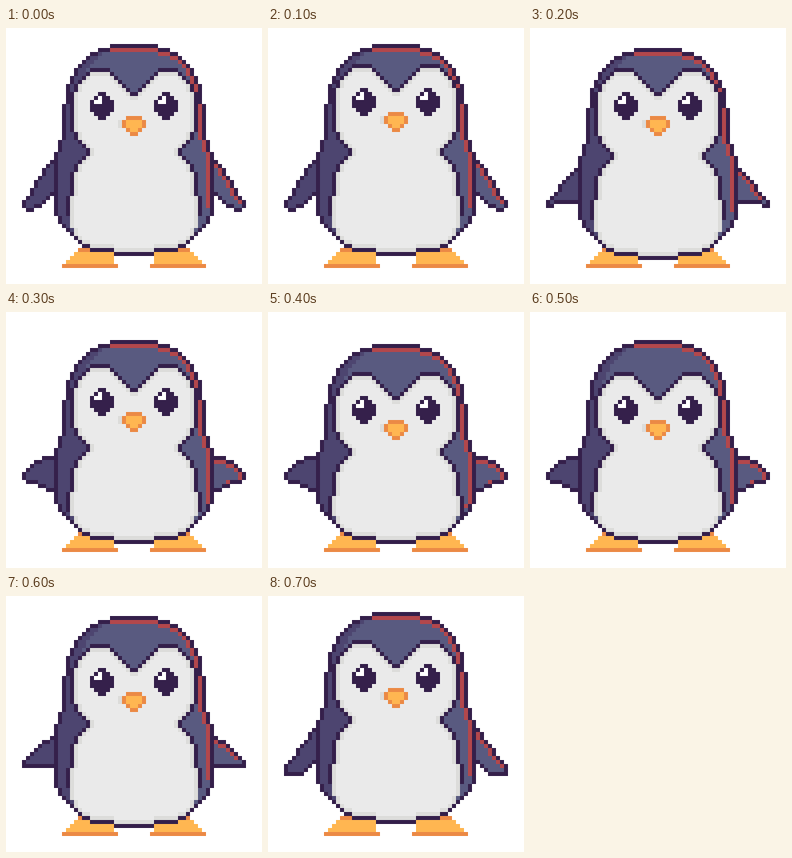
An HTML page with a canvas for the animation above (0.8 s loop, 320 by 320 pixels).

```html
<!DOCTYPE html>
<html lang="en">
<head>
<meta charset="utf-8">
<title>Pixel penguin</title>
<style>
html, body { margin: 0; width: 100%; height: 100%; overflow: hidden; background: #fff; }
canvas { display: block; width: 100vw; height: 100vh; image-rendering: pixelated; }
</style>
</head>
<body>
<canvas id="stage" width="320" height="320"></canvas>
<script>
const ctx = document.getElementById('stage').getContext('2d');
const N = 64, CELL = 5, STEP = 100;
const INK = '#35204b', BLUE = '#595a80', SHADE = '#4d4570', RED = '#b2474c';
const WHITE = '#eaeaea', GRAY = '#dcdcda', GOLD = '#ffb651', AMBER = '#eb8a46';

// Left edges of the half figure; the right half mirrors them.
const HEAD = [26, 23, 21, 20, 19, 18, 17, 17, 16, 16, 15, 15, 15, 15, 15,
  14, 14, 14, 14, 14, 14, 14, 14, 14, 13, 13, 13];
const BASE = [27, 21, 19, 18, 17, 16, 15, 14, 13, 13];
const MASK = [21, 20, 19, 18, 18];
const NOTCH = [18, 18, 19, 20, 21, 21, 20, 19, 18, 18, 17, 17, 17, 17, 17];
const BELLY = [99, 27, 21, 19, 18, 17, 17];
const PEAK = [12, 13, 14, 15, 16, 17];

// Wing shapes: first row, left edges, right edges of the last rows.
const WINGS = {
  down: [33, [11, 10, 9, 9, 8, 7, 7, 6, 6, 5, 4, 4, 5], [10, 9, 8, 6]],
  rise: [35, [11, 10, 9, 8, 7, 7, 6, 5, 4, 4], [5]],
  flat: [36, [9, 7, 6, 5, 4, 4, 5, 8, 10], []],
  fall: [35, [11, 9, 8, 7, 6, 5, 4, 4], []],
  drop: [33, [11, 10, 10, 9, 8, 7, 7, 6, 5, 4, 4, 4], [10, 9, 8]]
};
const WING_CYCLE = ['down', 'down', 'rise', 'flat', 'flat', 'flat', 'fall', 'drop'];
const FACE_SHIFT = [0, -1, 0, 3, 5, 5, 2, 1];

const half = c => Math.min(c, N - 1 - c);
const at = (list, i, other) => i >= 0 && i < list.length ? list[i] : other;

function px(c, r, color, w = 1) {
  ctx.fillStyle = color;
  ctx.fillRect(c * CELL, r * CELL, w * CELL, CELL);
}

function touches(c, r, test) {
  return test(c - 1, r) || test(c + 1, r) || test(c, r - 1) || test(c, r + 1);
}

function eachCell(paint) {
  for (let r = 0; r < N; r++) for (let c = 0; c < N; c++) paint(c, r);
}

function drawFeet() {
  const lefts = [18, 17, 16, 15, 14];
  lefts.forEach((l, i) => {
    const r = 55 + i, w = i === 4 ? 14 : 27 - l;
    const color = i === 0 || i === 4 ? AMBER : GOLD;
    px(l, r, color, w);
    px(N - l - w, r, color, w);
  });
}

function drawWings([top, lefts, tail]) {
  const inside = (c, r) => {
    const x = half(c), i = r - top;
    if (x >= 12) return true;
    const right = at(tail, i - lefts.length + tail.length, 11);
    return x >= at(lefts, i, 99) && x <= right;
  };
  const outside = (c, r) => !inside(c, r);
  const edge = (c, r) => inside(c, r) && touches(c, r, outside);
  eachCell((c, r) => {
    if (half(c) >= 12 || outside(c, r)) return;
    const lit = c > 32 && (edge(c, r - 1) || edge(c + 1, r)) && r < top + lefts.length - 2;
    px(c, r, edge(c, r) ? INK : lit ? RED : c < 32 ? SHADE : BLUE);
  });
}

function drawBody(drop, face) {
  const top = 4 + drop, base = drop ? 57 : 56;
  const left = r => r < top || r > base ? 99 :
    Math.max(at(HEAD, r - top, 12), at(BASE, base - r, 12));
  const inside = (c, r) => half(c) >= left(r);
  const outside = (c, r) => !inside(c, r);
  const edge = (c, r) => inside(c, r) && touches(c, r, outside);
  const white = (c, r) => {
    const x = half(c), y = r - face;
    if (y < 11 || r >= base || y < at(PEAK, x - 26, 11)) return false;
    const side = r - top > 37 ? 16 : 17;
    return x >= Math.max(side, at(MASK, y - 11, 0),
      at(NOTCH, r - top - 22, 0), at(BELLY, base - r, 0));
  };
  const notWhite = (c, r) => !white(c, r);

  eachCell((c, r) => {
    if (outside(c, r)) return;
    let color;
    if (edge(c, r)) color = INK;
    else if (white(c, r)) color = touches(c, r, notWhite) ? GRAY : WHITE;
    else if (touches(c, r, white) && r < top + 43) color = INK;
    else if (r < top + 41 && (c > 32 && edge(c + 1, r) || c > 25 && edge(c, r - 1))) color = RED;
    else color = c < 32 && (c - left(r) < 3 || r > top + 20) ? SHADE : BLUE;
    px(c, r, color);
  });
}

function drawEye(c, r) {
  [2, 4, 6, 6, 6, 4, 2].forEach((w, i) => px(c + 3 - w / 2, r + i, INK, w));
  px(c + 2, r + 1, '#fff');
  px(c + 1, r + 2, '#fff', 2);
}

function drawBeak(r) {
  px(28, r + 1, GRAY);
  px(28, r + 2, GRAY);
  [4, 6, 6, 4, 2].forEach((w, i) => {
    px(32 - w / 2, r + i, AMBER, w);
    if (i > 0 && i < 4) px(33 - w / 2, r + i, GOLD, w - 2);
  });
}

function draw(step) {
  const drop = Math.round(4 * Math.sin(Math.PI * step / 8) ** 4);
  const face = FACE_SHIFT[step];
  ctx.fillStyle = '#fff';
  ctx.fillRect(0, 0, 320, 320);
  drawFeet();
  drawWings(WINGS[WING_CYCLE[step]]);
  drawBody(drop, face);
  drawEye(21, 16 + face);
  drawEye(37, 16 + face);
  drawBeak(22 + face);
}

const start = performance.now();
function tick() {
  draw(Math.floor((performance.now() - start) / STEP) % 8);
  requestAnimationFrame(tick);
}
tick();
</script>
</body>
</html>
```
